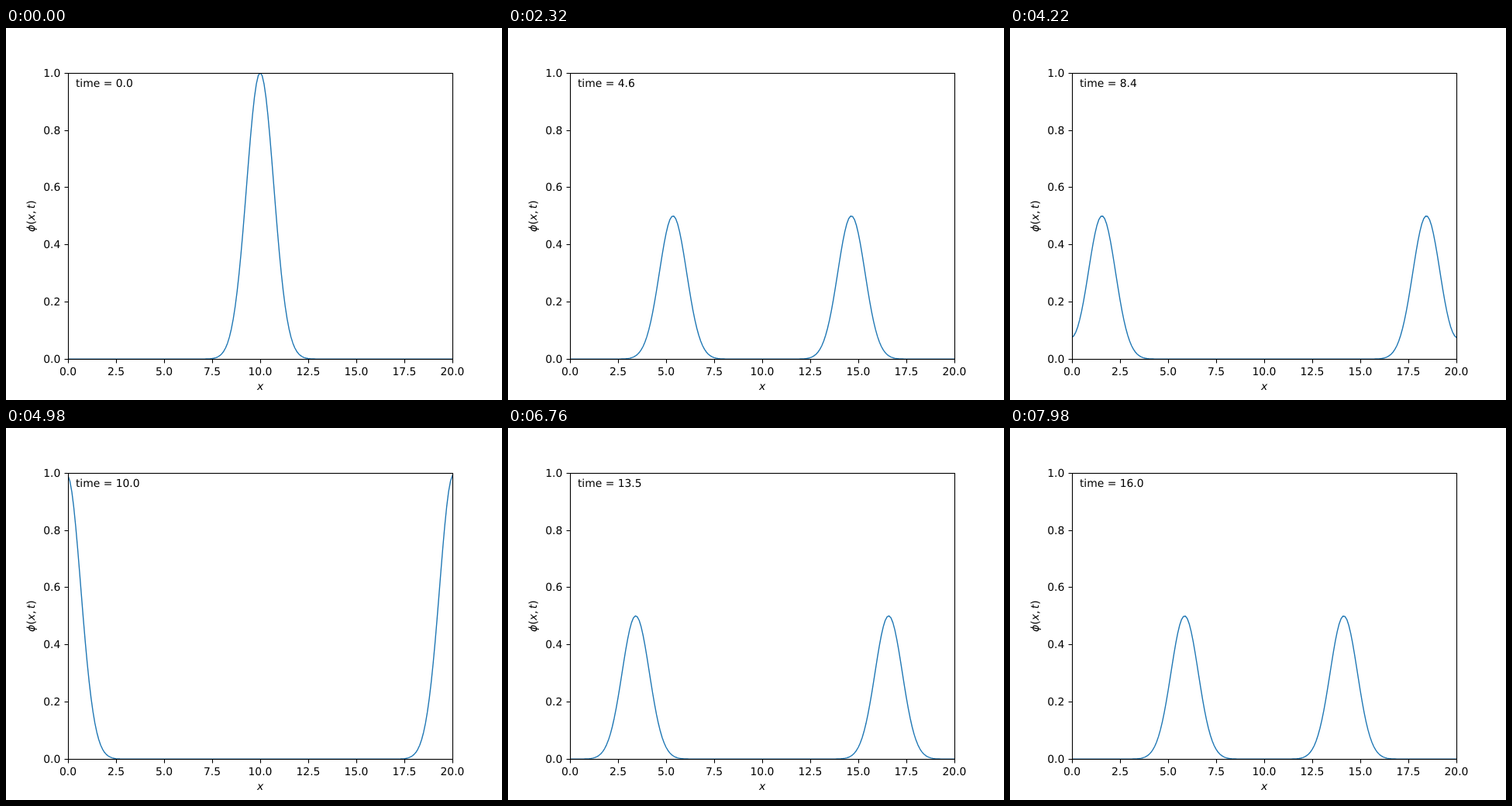
Write an HTML page that moves like this. It is 640x480 px and loops after 8000 ms.

```html
<!DOCTYPE html>
<html lang="en">
<head>
<meta charset="utf-8">
<title>Travelling pulses</title>
<style>
  html, body { margin: 0; width: 100%; height: 100%; overflow: hidden; background: #fff; }
  svg { display: block; width: 640px; height: 480px; }
  text { font: 13.889px "DejaVu Sans", sans-serif; white-space: pre; text-rendering: geometricPrecision; }
  .math { font-style: italic; }
  .upright { font-style: normal; }
  .axis { fill: none; stroke: #000; stroke-width: 1.11; }
  #curve { fill: none; stroke: #1f77b4; stroke-width: 1.389; stroke-linejoin: round; stroke-linecap: square; }
</style>
</head>
<body>
<svg id="plot" viewBox="0 0 640 480">
  <clipPath id="inside"><rect x="80" y="58" width="496" height="369"/></clipPath>
  <g clip-path="url(#inside)"><path id="curve"/></g>
  <rect class="axis" x="80.5" y="58.5" width="496" height="369"/>
  <g id="ticks"></g>
  <text class="math" x="328" y="467" text-anchor="middle">x</text>
  <text class="math" transform="translate(37 242.6) rotate(-90)" text-anchor="middle">ϕ<tspan class="upright">(</tspan>x<tspan class="upright">,</tspan><tspan dx="2.5">t</tspan><tspan class="upright">)</tspan></text>
  <text id="clock" x="89.9" y="76"></text>
</svg>
<script>
const LOOP = 8000, STEP = 20, DT = 0.04;
const DX = 0.1, POINTS = 201, PERIOD = POINTS * DX;
const curve = document.getElementById('curve');
const clock = document.getElementById('clock');
const ticks = document.getElementById('ticks');

const toX = x => 80 + 24.8 * x;
const toY = y => 427.2 - 369.6 * y;

function add(tag, attributes, content = '') {
  const node = document.createElementNS('http://www.w3.org/2000/svg', tag);
  for (const key in attributes) node.setAttribute(key, attributes[key]);
  node.textContent = content;
  ticks.append(node);
}

for (let i = 0; i <= 8; i++) {
  const x = toX(2.5 * i);
  add('path', { class: 'axis', d: `M${x + 0.5} 427.5v5` });
  add('text', { x, y: 448, 'text-anchor': 'middle' }, (2.5 * i).toFixed(1));
}
for (let i = 0; i <= 5; i++) {
  const y = Math.round(toY(i / 5));
  add('path', { class: 'axis', d: `M80.5 ${y + 0.5}h-5` });
  add('text', { x: 70.3, y: y + 5, 'text-anchor': 'end' }, (i / 5).toFixed(1));
}

// The domain is periodic, one grid cell longer than the visible axis.
function pulse(distance) {
  const d = distance - PERIOD * Math.round(distance / PERIOD);
  return Math.exp(-d * d) / 2;
}

function draw(now) {
  const time = Math.floor((now % LOOP) / STEP) * DT;
  const points = Array.from({ length: POINTS }, (_, i) => {
    const x = i * DX;
    const height = pulse(x - 10 - time) + pulse(x - 10 + time);
    return `${toX(x).toFixed(2)} ${toY(height).toFixed(3)}`;
  });
  curve.setAttribute('d', 'M' + points.join('L'));
  clock.textContent = `time = ${time.toFixed(1)}`;
}

function tick(now) {
  draw(now);
  requestAnimationFrame(tick);
}
draw(0);
requestAnimationFrame(tick);
</script>
</body>
</html>
```
